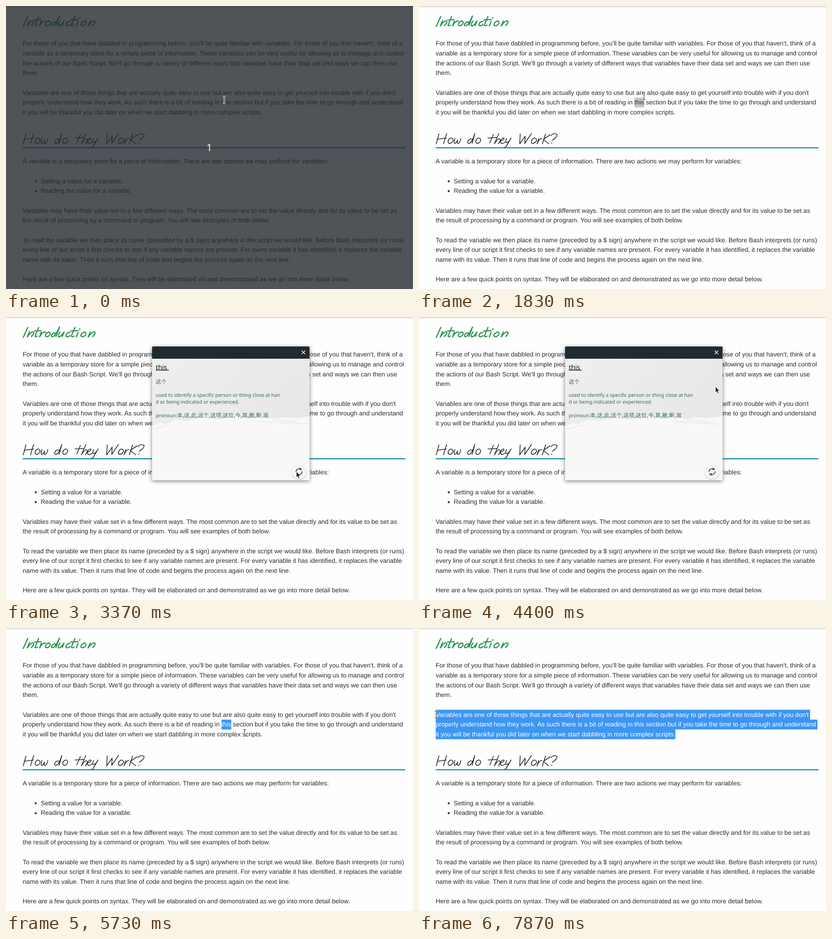
Write an HTML page that moves like this. It is 897x624 px and loops after 8000 ms.

```html
<!DOCTYPE html>
<html lang="en">
<head>
<meta charset="utf-8">
<title>Word lookup</title>
<style>
html, body { margin: 0; width: 100%; height: 100%; overflow: hidden; background: #fefefe; }
svg { display: block; width: 897px; height: 624px; }
text { white-space: pre; text-rendering: geometricPrecision; }
#lines { font: 13.94px "Liberation Sans", Arial, sans-serif; }
.hand { fill: none; stroke-linecap: round; stroke-linejoin: round; }
.pop { font: 10.85px "Noto Sans", sans-serif; fill: #2f6b57; }
.cjk { font: 12px "Noto Sans CJK SC", "Noto Sans CJK", sans-serif; }
</style>
</head>
<body>
<svg viewBox="0 0 897 624">
  <defs>
    <g id="lines"></g>
    <clipPath id="sel"><rect/><rect/><rect/></clipPath>
    <linearGradient id="top" x2="0" y2="1">
      <stop stop-color="#cfcfcf"/><stop offset="1" stop-color="#fefefe"/>
    </linearGradient>
    <linearGradient id="paper" x2="1" y2="1">
      <stop stop-color="#efefee"/><stop offset="1" stop-color="#e4e4e3"/>
    </linearGradient>
    <filter id="blur" x="-10%" y="-10%" width="120%" height="120%"><feGaussianBlur stdDeviation="5"/></filter>
    <path id="beam" d="M-3 -7.5Q0 -7.5 0 -6Q0 -7.5 3 -7.5M0 -6V6M-3 7.5Q0 7.5 0 6Q0 7.5 3 7.5"/>
    <path id="turn" d="M-6.5 1A6.5 6.5 0 0 1 2 -6.2"/>
    <path id="head" d="M1.5 -9.2L7 -4.8L0.8 -3.2Z"/>
  </defs>

  <rect width="897" height="624" fill="#fefefe"/>
  <rect width="897" height="4" fill="url(#top)"/>

  <path class="hand" role="img" aria-label="Introduction" stroke="#2a9450" stroke-width="2.5" d="
    M48 23L38 45 M52 32L47 44Q56 31 60 33T56 43 M72 23L64 42Q65 45 69 42M63 31L77 30
    M78 33L74 44Q80 32 87 33 M94 33Q86 36 87 42Q91 46 97 39Q98 33 94 33
    M111 36Q102 33 100 42Q104 47 112 34L118 22L110 43 M119 33Q113 42 116 44Q121 44 128 33L124 43
    M141 34Q133 34 132 42Q135 46 141 41 M152 23L144 42Q146 45 150 42M143 31L159 30
    M159 34L155 44M162 27l1 -1 M173 33Q165 36 165 42Q170 46 176 39Q177 33 173 33
    M186 33L181 44Q191 31 195 33T191 43"/>
  <path class="hand" role="img" aria-label="How do they Work?" stroke="#222" stroke-width="1.6" d="
    M44 282L38 304M61 281L54 304M40 294L60 291 M70 291Q62 295 65 302Q71 305 75 297Q75 291 70 291
    M79 292Q76 303 79 303Q83 302 85 295Q83 304 87 303Q91 300 92 292
    M118 294Q109 291 107 301Q111 307 118 295L123 281L117 303 M131 291Q123 295 126 302Q132 305 136 297Q136 291 131 291
    M164 283L156 302M152 291L171 290 M176 281L166 304Q175 290 178 293T175 304
    M179 298Q189 295 187 291Q181 291 179 300Q183 306 190 300
    M193 292Q189 302 194 301Q199 299 203 291L193 308Q189 315 188 311
    M223 282L222 304L234 287L233 303L248 281 M254 291Q246 295 248 302Q254 305 259 297Q259 291 254 291
    M264 292L260 304Q265 292 271 292 M279 282L272 304M289 284L274 294L286 304
    M291 286Q296 279 304 283Q306 288 294 296M292 303l1 -1"/>
  <rect x="36.8" y="311.4" width="843.4" height="2.4" fill="#0a88b5"/>
  <g fill="#2b2b2b"><circle cx="65.5" cy="386.5" r="2.2"/><circle cx="65.5" cy="408.2" r="2.2"/></g>

  <rect id="grey" x="475" y="202" width="21.5" height="21.6" fill="#c6c6c6"/>
  <use href="#lines" fill="#2b2b2b"/>
  <g id="blue">
    <rect width="897" height="624" fill="#3d96f2" clip-path="url(#sel)"/>
    <use href="#lines" fill="#fff" clip-path="url(#sel)"/>
  </g>

  <g id="popup">
    <rect id="shade" x="322" y="67" width="347" height="295" filter="url(#blur)"/>
    <g id="panel">
      <rect x="322" y="65" width="347" height="295" rx="2" fill="#1f2b31"/>
      <rect x="322" y="92" width="347" height="268" fill="url(#paper)"/>
      <path fill="#f8f8f7" d="M322 241L338 233L352 236L372 226L398 229L430 223L470 226L505 220L540 224L562 219L590 225L612 221L640 223L669 219V360H322Z"/>
      <path stroke="#eeeeed" stroke-width="3" fill="none" d="M326 247L360 238M560 231L664 236M590 227L640 231"/>
      <circle id="hot" cx="655.5" cy="78" r="10.5" fill="#e5475f"/>
      <path stroke="#fff" stroke-width="1.4" d="M651.5 74l8 8m0 -8l-8 8"/>
      <circle cx="646" cy="342" r="17.5" opacity=".12"/>
      <circle cx="646" cy="340.5" r="17" fill="#f4f4f3"/>
      <g transform="translate(646 341)" fill="#444">
        <use href="#turn" fill="none" stroke="#444" stroke-width="1.7"/><use href="#head"/>
        <g transform="rotate(180)"><use href="#turn" fill="none" stroke="#444" stroke-width="1.7"/><use href="#head"/></g>
      </g>
      <g id="entry" class="pop">
        <text x="330" y="115.5" font-size="14.6" style="font-size:14.6px" fill="#111"><tspan fill="#111" text-decoration="underline">this </tspan></text>
        <text class="cjk" x="330" y="146.5">这个</text>
        <text x="330" y="176">used to identify a specific person or thing close at han</text>
        <text x="330" y="191.3">d or being indicated or experienced.</text>
        <text x="330" y="221">pronoun:<tspan class="cjk">本,这,此,这个,这项,这位,今,其,敝,斯,滋</tspan></text>
      </g>
    </g>
  </g>

  <g id="count">
    <rect width="897" height="624" fill="#25292f" opacity=".8"/>
    <text x="448" y="320" text-anchor="middle" fill="#fff" style="font:22px 'Noto Sans', sans-serif">1</text>
  </g>

  <g id="cursor">
    <g id="ibeam" fill="none"><use href="#beam" stroke="#fff" stroke-width="2.8"/><use href="#beam" stroke="#222" stroke-width="1.1"/></g>
    <path id="arrow" d="M0 0V13L3 10.3L5 15L7.2 14L5.2 9.5H9Z" fill="#111" stroke="#fff" stroke-width=".8"/>
  </g>
</svg>
<script>
const $ = id => document.getElementById(id);
const LOOP = 8000, PITCH = 21.67, LEFT = 36.8, SEL_TOP = 180.3;

// One entry per grid row; "*" marks a list item.
const rows = `For those of you that have dabbled in programming before, you'll be quite familiar with variables. For those of you that haven't, think of a
variable as a temporary store for a simple piece of information. These variables can be very useful for allowing us to manage and control
the actions of our Bash Script. We'll go through a variety of different ways that variables have their data set and ways we can then use
them.

Variables are one of those things that are actually quite easy to use but are also quite easy to get yourself into trouble with if you don't
properly understand how they work. As such there is a bit of reading in this section but if you take the time to go through and understand
it you will be thankful you did later on when we start dabbling in more complex scripts.




A variable is a temporary store for a piece of information. There are two actions we may perform for variables:

*Setting a value for a variable.
*Reading the value for a variable.

Variables may have their value set in a few different ways. The most common are to set the value directly and for its value to be set as
the result of processing by a command or program. You will see examples of both below.

To read the variable we then place its name (preceded by a $ sign) anywhere in the script we would like. Before Bash interprets (or runs)
every line of our script it first checks to see if any variable names are present. For every variable it has identified, it replaces the variable
name with its value. Then it runs that line of code and begins the process again on the next line.

Here are a few quick points on syntax. They will be elaborated on and demonstrated as we go into more detail below.`.split("\n");

rows.forEach((row, i) => {
  if (!row) return;
  const text = document.createElementNS("http://www.w3.org/2000/svg", "text");
  const item = row[0] === "*";
  text.textContent = item ? row.slice(1) : row;
  text.setAttribute("x", LEFT + (item ? 39.6 : 0));
  text.setAttribute("y", 87.2 + PITCH * i);
  $("lines").append(text);
});

// Tracks of [time, x, y].
const mouse = [
  [0, 481, 207], [970, 481, 207], [1000, 514, 185], [1150, 514, 185], [1500, 500, 205],
  [1800, 500, 205], [1830, 496, 199], [2470, 496, 199], [3300, 640, 341], [3840, 640, 341],
  [4600, 658, 87], [4800, 658, 87], [5430, 467, 231], [5500, 467, 231], [5530, 495, 231],
  [5640, 495, 231], [5730, 526, 231], [5840, 527, 231], [6030, 561, 231], [6140, 561, 231],
  [6450, 510, 230], [6730, 428, 217], [6970, 334, 200], [7770, 58, 191], [7840, 58, 191], [7870, 38, 191]
];
const drag = [
  [6170, 565, 234], [6480, 470, 230], [6500, 455, 215], [6730, 363.5, 212],
  [6880, 340, 203], [6900, 338, 195], [7000, 330, 191], [7770, LEFT, 191]
];
const ends = [862, 878, 565];
const bands = [...$("sel").children];

function at(track, t) {
  const i = track.findIndex(k => k[0] > t);
  if (i < 0) return track[track.length - 1].slice(1);
  if (!i) return track[0].slice(1);
  const [t0, x0, y0] = track[i - 1], [t1, x1, y1] = track[i];
  const p = (t - t0) / (t1 - t0);
  return [x0 + (x1 - x0) * p, y0 + (y1 - y0) * p];
}

const show = (id, on) => $(id).style.display = on ? "" : "none";
const clamp = v => Math.min(1, Math.max(0, v));

function select(t) {
  const [x, y] = at(drag, t);
  const first = Math.floor((y - SEL_TOP) / PITCH);
  bands.forEach((band, i) => {
    let from = i < first ? ends[i] : i === first ? x : LEFT, to = ends[i];
    if (t < 6170) [from, to] = i === 1 ? [475, 496.5] : [0, 0];
    band.setAttribute("x", from);
    band.setAttribute("width", Math.max(0, to - from));
    band.setAttribute("y", SEL_TOP + PITCH * i);
    band.setAttribute("height", PITCH);
  });
}

function draw(t) {
  show("count", t < 30);
  show("grey", t >= 1330 && t < 4870);
  show("blue", t >= 400 && t < 1330 || t >= 4870);
  select(t);

  const level = t < 4700 ? clamp((t - 1930) / 140) : clamp(1 - (t - 4700) / 200);
  const scale = 0.8 + 0.2 * level;
  show("popup", t >= 1970 && level > 0);
  $("popup").setAttribute("transform", `translate(495.5 212.5) scale(${scale}) translate(-495.5 -212.5)`);
  $("panel").setAttribute("opacity", level);
  $("shade").setAttribute("opacity", level * (t < 2500 ? 0.35 : 0.5));
  show("entry", t >= 3370);
  show("hot", t >= 4480);

  const [x, y] = at(mouse, t), pointing = t >= 2070 && t < 4740;
  $("cursor").setAttribute("transform", `translate(${x} ${y})`);
  show("arrow", pointing);
  show("ibeam", !pointing);
}

const start = performance.now();
function tick(now) {
  draw(Math.max(0, now - start) % LOOP);
  requestAnimationFrame(tick);
}
draw(0);
requestAnimationFrame(tick);
</script>
</body>
</html>
```
